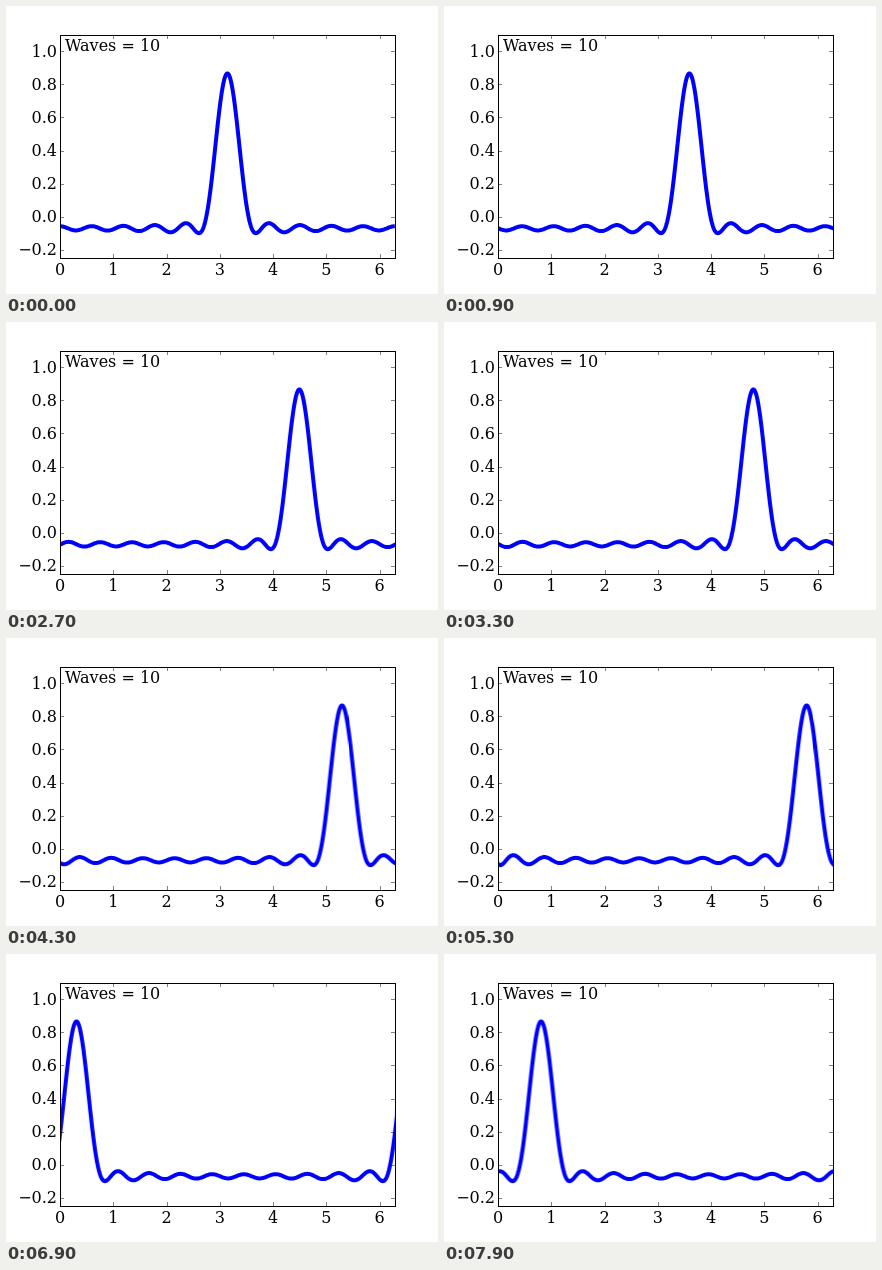
Recreate the animation shown at these times as an HTML page. Size 432 px wide and 288 px high, loop 8000 ms.

```html
<!DOCTYPE html>
<html lang="en">
<head>
<meta charset="utf-8">
<title>Travelling wave packet</title>
<style>
  html, body { margin: 0; width: 100%; height: 100%; overflow: hidden; background: #fff; }
  svg { display: block; }
  text { font: 16px "DejaVu Serif", "Bitstream Vera Serif", "Noto Serif", serif; fill: #000; }
  .x-label { text-anchor: middle; }
  .y-label { text-anchor: end; }
  .frame { fill: none; stroke: #000; }
  .ticks { fill: none; stroke: #000; stroke-width: .5; }
  .wave {
    fill: none; stroke: #00f; stroke-width: 4; stroke-linejoin: round;
    animation: travel 8s steps(80, end) infinite;
  }
  /* 80 steps of 0.05 rad: 4 rad of the 334.8px wide period */
  @keyframes travel { to { transform: translateX(213.14px); } }
</style>
</head>
<body>
<svg width="432" height="288" viewBox="0 0 432 288">
  <clipPath id="plot"><rect x="54" y="29" width="335" height="223"/></clipPath>
  <g clip-path="url(#plot)"><path class="wave" id="wave"/></g>
  <path class="ticks" id="ticks"/>
  <rect class="frame" x="54.5" y="29.5" width="335" height="223"/>
  <g id="labels"></g>
  <text x="59" y="45">Waves = 10</text>
</svg>
<script>
  const TAU = 2 * Math.PI;
  const WAVES = 10;
  const toX = v => 54 + v * 334.8 / TAU;
  const toY = v => 252 - (v + 0.25) * 223.2 / 1.35;
  const snap = v => Math.floor(v + 0.5) + 0.5;
  const byId = id => document.getElementById(id);

  // Truncated Fourier series of exp(-16 x^2), without its mean
  function packet(x) {
    let sum = 0;
    for (let k = 1; k <= WAVES; k++) sum += Math.exp(-k * k / 64) * Math.cos(k * x);
    return sum / (4 * Math.sqrt(Math.PI));
  }

  // Two periods, so that the moving curve always fills the plot
  const points = [];
  for (let i = -600; i <= 600; i++) {
    const x = i * TAU / 600;
    points.push(toX(x).toFixed(2) + ',' + toY(packet(x - Math.PI)).toFixed(2));
  }
  byId('wave').setAttribute('d', 'M' + points.join('L'));

  function addLabel(kind, x, y, value) {
    const label = document.createElementNS('http://www.w3.org/2000/svg', 'text');
    label.setAttribute('class', kind);
    label.setAttribute('x', x);
    label.setAttribute('y', y);
    label.textContent = value;
    byId('labels').append(label);
  }

  let ticks = '';
  for (let v = 0; v <= 6; v++) {
    const x = snap(toX(v));
    ticks += `M${x} 252v-4M${x} 30v3`;
    addLabel('x-label', toX(v), 269, v);
  }
  for (let i = -1; i <= 5; i++) {
    const v = i / 5, y = snap(toY(v));
    ticks += `M55 ${y}h3M389 ${y}h-4`;
    addLabel('y-label', 51, Math.round(toY(v) + 5.2), v.toFixed(1).replace('-', '\u2212'));
  }
  byId('ticks').setAttribute('d', ticks);
</script>
</body>
</html>
```
